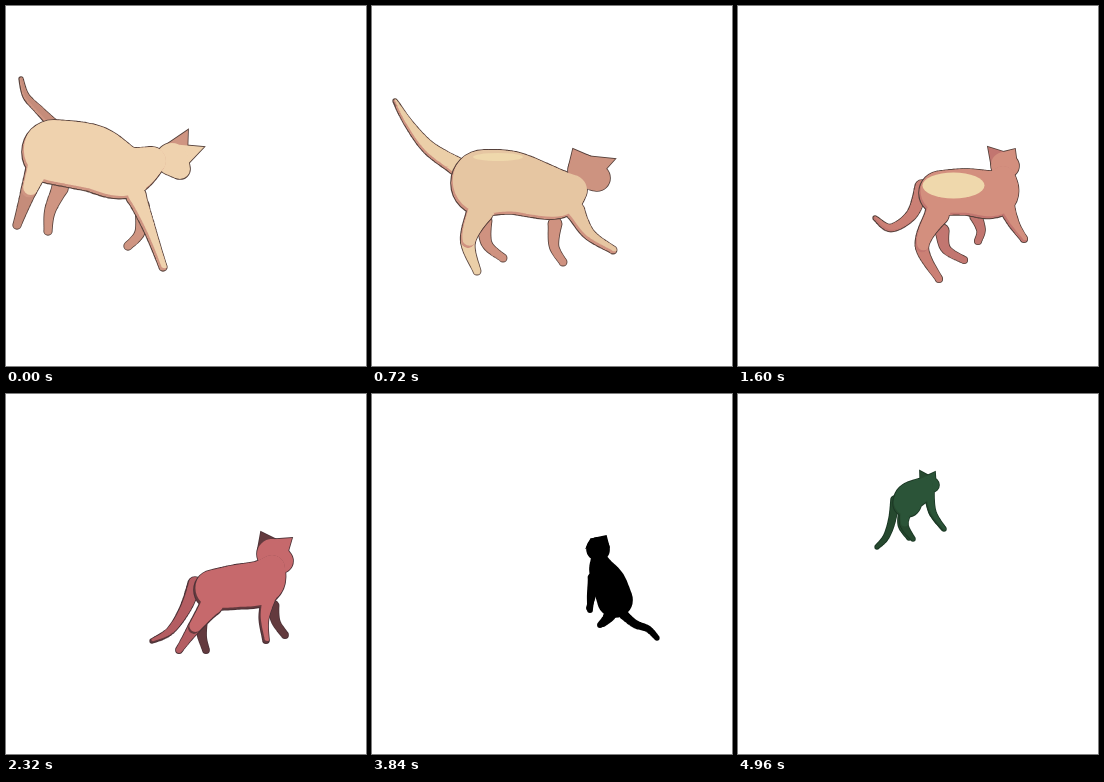
Recreate the animation shown at these times as an HTML page with a canvas. Size 360 px wide and 360 px high, loop 5040 ms.

```html
<!DOCTYPE html>
<html lang="en">
<head>
<meta charset="utf-8">
<title>Walking cat</title>
<style>
html, body { margin: 0; height: 100%; overflow: hidden; background: #fff; }
canvas { display: block; width: 100vmin; height: 100vmin; }
</style>
</head>
<body>
<canvas id="stage" width="360" height="360"></canvas>
<script>
const ctx = document.getElementById('stage').getContext('2d');
const LOOP = 5040, STEP = 80;

// A pose is a small skeleton: torso and head are balls x,y,radius; legs are hip, knee, paw.
// colors: coat, shade, face, tips, outline. glow: width, height, lift of the light on the back.
// bend and sway: how far the body and the tail tip swing out on the way to the next pose.
const poses = [
  { at: 0, size: 1, tailWidth: 5, colors: 'efd2ae cf9582 efd2ae c58c7a 55403a', bend: [0, 8], sway: [-4, -22],
    torso: '48,146,32 85,152,33 118,166,26 146,155,14', head: '166,153,16 174,163,10', ears: '182,124 198,141',
    tail: '46,117 33,104 20,90 15,73',
    hindNear: '36,150 23,184 11,219', hindFar: '54,182 44,205 42,225',
    foreNear: '130,190 143,222 157,261', foreFar: '136,200 134,226 122,240' },
  { at: 720, size: .95, tailWidth: 9, colors: 'e6c6a2 cf9280 cd9380 ebcfa8 55403a', bend: [22, 5], sway: [0, -60], glow: [25, 4, 26],
    torso: '112,177,33 140,177,31 182,188,25 200,184,15', head: '212,165,16 225,172,13', ears: '201,143 243,153',
    tail: '84,160 57,142 37,118 23,95',
    hindNear: '108,205 96,235 105,265', hindFar: '112,215 115,238 131,252',
    foreNear: '203,205 217,228 241,244', foreFar: '183,218 182,240 191,256' },
  { at: 1600, size: .85, tailWidth: 7, colors: 'd38f7e c27670 d38f7e cb8075 55403a', bend: [6, 3], sway: [-20, 0], glow: [31, 13, 7],
    torso: '203,187,22 228,186,23 256,188,23 265,172,12', head: '266,159,13 270,160,11', ears: '250,141 277,143',
    tail: '184,181 174,208 153,222 137,212',
    hindNear: '199,208 184,240 201,273', hindFar: '204,225 208,243 226,254',
    foreNear: '268,200 276,218 286,233', foreFar: '238,210 243,224 240,235' },
  { at: 2320, size: .8, tailWidth: 7, colors: 'c6696c 633a3e c6696c b45d62 4c3237', bend: [-2, 2], sway: [-8, 0],
    torso: '208,196,20 230,193,22 255,189,22 266,174,13', head: '266,160,15 275,167,12', ears: '255,138 286,144',
    tail: '189,190 179,215 164,237 146,247',
    hindNear: '205,211 188,234 173,256', hindFar: '195,226 196,242 200,256',
    foreNear: '264,198 258,224 260,246', foreFar: '267,212 270,228 279,241' },
  { at: 3120, size: .6, tailWidth: 3, colors: '444046 2c292e 444046 353237 080808', bend: [-10, 0], sway: [-45, 0],
    torso: '226,212,17 228,202,18 242,195,15 245,186,10', head: '247,178,12 252,179,10', ears: '236,161 265,163',
    tail: '225,227 216,237 212,250 208,261',
    hindNear: '231,218 230,238 240,251', hindFar: '211,228 209,240 218,252',
    foreNear: '250,202 250,224 254,242', foreFar: '246,207 247,224 253,240' },
  { at: 3840, size: .55, tailWidth: 4, colors: '000000 000000 000000 000000 000000', bend: [0, 8], sway: [75, 20],
    torso: '243,206,17 237,189,16 230,176,12 227,165,7', head: '226,155,11 227,156,10', ears: '219,145 234,142',
    tail: '252,221 263,230 276,235 285,244',
    hindNear: '241,212 236,223 228,231', hindFar: '245,214 238,224 231,230',
    foreNear: '222,184 219,202 218,216', foreFar: '223,188 220,203 217,214' },
  { at: 4960, size: .5, tailWidth: 4, colors: '2b5438 26492f 2b5438 26492f 1b3825',
    torso: '169,109,14 172,103,14 182,97,12 187,92,8', head: '190,90,8 194,91,7', ears: '182,77 197,78',
    tail: '157,106 154,126 148,143 139,153',
    hindNear: '169,112 166,130 175,145', hindFar: '165,115 163,131 171,144',
    foreNear: '191,99 195,119 206,135', foreFar: '190,101 194,119 205,134' }
];

// Hip radius and stride direction of each leg
const legs = { hindNear: [14, 1], foreNear: [10, -1], hindFar: [8, -1], foreFar: [7, 1] };
const parts = ['torso', 'head', 'ears', 'tail', ...Object.keys(legs)];

const points = text => text.split(' ').map(p => p.split(',').map(Number));
const rgb = hex => [0, 2, 4].map(i => parseInt(hex.slice(i, i + 2), 16));
const mix = (a, b, u) => Array.isArray(a) ? a.map((v, i) => mix(v, b[i], u)) : a + (b - a) * u;

for (const pose of poses) {
  for (const part of parts) pose[part] = points(pose[part]);
  pose.colors = pose.colors.split(' ').map(rgb);
  pose.glow ??= [0, 0, 0];
}

// Point on a Catmull-Rom curve through all joints, u from 0 to 1
function along(joints, u) {
  const last = joints.length - 1, i = Math.min(last - 1, Math.floor(u * last)), f = u * last - i;
  const [a, b, c, d] = [-1, 0, 1, 2].map(k => joints[Math.max(0, Math.min(last, i + k))]);
  return b.map((v, n) => v + f / 2 * (c[n] - a[n]
    + f * (2 * a[n] - 5 * v + 4 * c[n] - d[n] + f * (3 * (v - c[n]) + d[n] - a[n]))));
}

// Round body part swept along its joints
function tube(joints, radius, from = 0, to = 1) {
  const path = new Path2D(), count = 48;
  for (let i = 0; i <= count; i++) {
    const u = from + (to - from) * i / count;
    const [x, y, r = radius(u)] = along(joints, u);
    path.moveTo(x + r, y);
    path.arc(x, y, Math.max(r, .5), 0, 7);
  }
  return path;
}

function ear([x, y, r], [tipX, tipY]) {
  const path = new Path2D(), angle = Math.atan2(tipY - y, tipX - x);
  for (const side of [-.75, .75]) path.lineTo(x + r * Math.cos(angle + side), y + r * Math.sin(angle + side));
  path.lineTo(tipX, tipY);
  path.closePath();
  return path;
}

function join(paths) {
  const all = new Path2D();
  paths.forEach(p => all.addPath(p));
  return all;
}

function fill(path, color) {
  ctx.fillStyle = color;
  ctx.fill(path);
}

// Fill that leaves a rim of shade at the lower left
function fillLit(path, color, shade, rim) {
  ctx.save();
  ctx.clip(path);
  fill(path, shade);
  ctx.translate(rim * .7, -rim);
  fill(path, color);
  ctx.restore();
}

function draw(t) {
  const k = Math.max(0, poses.findIndex(p => p.at >= t) - 1);
  const from = poses[k], to = poses[k + 1];
  const u = (t - from.at) / (to.at - from.at);
  const arc = Math.sin(Math.PI * u), stride = 9 * Math.sin(2 * Math.PI * u);
  const [size, tailWidth, glow] = ['size', 'tailWidth', 'glow'].map(key => mix(from[key], to[key], u));
  const [coat, shade, face, tips, line] = mix(from.colors, to.colors, u).map(c => `rgb(${c.map(Math.round)})`);

  const cat = {};
  for (const part of parts) {
    cat[part] = mix(from[part], to[part], u).map(([x, y, ...r], i, all) => {
      const reach = i / (all.length - 1);
      const step = legs[part] ? legs[part][1] * stride * reach : 0;
      const sway = part === 'tail' ? arc * reach : 0;
      return [x + from.bend[0] * arc + step + from.sway[0] * sway,
              y + from.bend[1] * arc + from.sway[1] * sway, ...r];
    });
  }
  const leg = (name, start, end) =>
    tube(cat[name], v => size * (legs[name][0] * (1 - v) ** 1.3 + 3.8 * v), start, end);

  const far = join([leg('hindFar'), leg('foreFar')]);
  const tail = tube(cat.tail, v => mix(tailWidth, 1.8, v));
  const head = tube(cat.head);
  const [earLeft, earRight] = cat.ears.map(tip => ear(cat.head[0], tip));
  const shin = leg('hindNear', .5, 1);
  const body = join([tube(cat.torso), leg('hindNear', 0, .5), leg('foreNear')]);
  const outline = path => ctx.stroke(path);

  ctx.fillStyle = '#fff';
  ctx.fillRect(0, 0, 360, 360);
  ctx.strokeStyle = line;
  ctx.lineWidth = 1.7;
  outline(far);
  fill(far, shade);
  outline(tail);
  fillLit(tail, tips, shade, 2 * size);
  [shin, head, earLeft, earRight, body].forEach(outline);
  fill(shin, tips);
  fill(earLeft, shade);
  fill(earRight, face);
  fill(head, face);
  fillLit(body, coat, shade, 2.5 * size);

  const [rump, middle] = cat.torso, [x, y] = mix(rump, middle, .5);
  const light = new Path2D();
  light.ellipse(x, y - glow[2], glow[0], glow[1], 0, 0, 7);
  fill(light, '#efd8ac');
}

function tick() {
  draw(Math.floor(performance.now() % LOOP / STEP) * STEP);
  requestAnimationFrame(tick);
}
tick();
</script>
</body>
</html>
```
